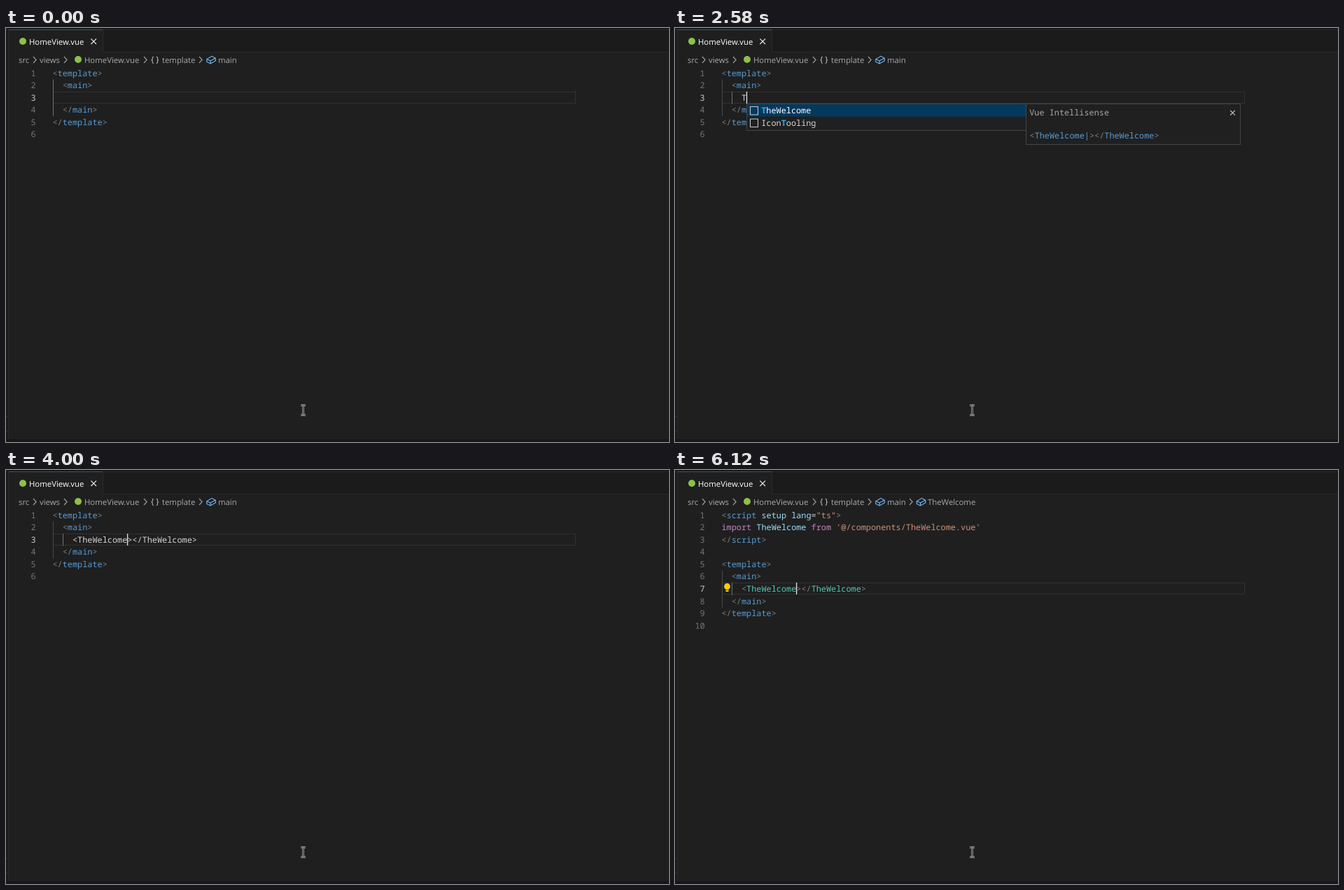
Recreate the animation shown at these times as an HTML page. Size 947 by 592 pixels, loop 6.18 s.

```html
<!DOCTYPE html>
<html lang="en">
<head>
<meta charset="utf-8">
<title>Component auto import</title>
<style>
  html, body { margin: 0; width: 100%; height: 100%; overflow: hidden; background: #1f1f1f; }
  svg { display: block; width: 947px; height: 592px; }
  text { white-space: pre; text-rendering: geometricPrecision; fill: #ccc; }
  .mono { font: 11.87px "Noto Sans Mono", monospace; }
  .ui { font: 11.35px "Open Sans", sans-serif; fill: #a9a9a9; }
  .line { fill: none; stroke-width: 1; }
  .dim { fill: #808080; }
  .tag { fill: #569cd6; }
  .comp { fill: #4ec9b0; }
  .attr { fill: #9cdcfe; }
  .str { fill: #ce9178; }
  .key { fill: #c586c0; }
  .plain { fill: #d4d4d4; }
  .match { fill: #2aaaff; font-weight: 600; }
  .white { fill: #fff; }
  .title { fill: #a6a6a6; }
</style>
</head>
<body>
<svg id="stage" viewBox="0 0 947 592"></svg>
<script>
const LOOP = 6180, LEFT = 66.5, PITCH = 7.12, ROW = 17.59;
const BLINKS = [290, 800, 1250, 1780, 2250, 3310, 3780, 4610, 5120, 5630, 6120];
const COMPONENTS = ['AboutView', 'HelloWorld', 'HomeView', 'IconCommunity', 'IconDocumentation',
  'IconEcosystem', 'IconSupport', 'IconTooling', 'TheWelcome', 'WelcomeItem'];
const stage = document.getElementById('stage');

const esc = s => s.replace(/&/g, '&amp;').replace(/</g, '&lt;');
const span = (cls, s) => `<tspan class="${cls}">${esc(s)}</tspan>`;
const text = (x, y, content, cls = 'mono', extra = '') =>
  `<text x="${x}" y="${y}" class="${cls}" ${extra}>${content}</text>`;
const rect = (x, y, w, h, fill) => `<rect x="${x}" y="${y}" width="${w}" height="${h}" fill="${fill}"/>`;
const frame = (x, y, w, h, stroke, fill = 'none') =>
  `<rect x="${x}" y="${y}" width="${w}" height="${h}" fill="${fill}" stroke="${stroke}"/>`;
const path = (d, stroke, width = 1) =>
  `<path d="${d}" class="line" stroke="${stroke}" style="stroke-width:${width}"/>`;
const cross = (x, y, r, stroke) => path(`M${x - r} ${y - r}l${2 * r} ${2 * r}m0 ${-2 * r}l${-2 * r} ${2 * r}`, stroke, 1.2);
const chevron = x => path(`M${x - 2} 41l4.2 4.5l-4.2 4.5`, '#a0a0a0', 1.1);
const cube = x => path(`M${x - 6.2} 44.6L${x + 1} 40.3L${x + 6.2} 43V47L${x - 1} 51L${x - 6.2} 48.4Z` +
  `M${x - 6.2} 44.6L${x - 1} 47L${x + 6.2} 43M${x - 1} 47V51`, '#75beff', 1.1);
const dot = (x, y) => `<circle cx="${x}" cy="${y}" r="5" fill="#8dc149"/>`;

const open = (name, cls = 'tag') => span('dim', '<') + span(cls, name) + span('dim', '>');
const close = (name, cls = 'tag') => span('dim', '</') + span(cls, name) + span('dim', '>');
const rowTop = n => 55.8 + ROW * (n - 1);

function chrome(crumbTail) {
  return rect(0, 0, 947, 592, '#1f1f1f') + rect(0, 0, 947, 2, '#181818') +
    rect(0, 0, 3, 592, '#1a1a1a') + rect(138, 2, 809, 33, '#1b1b1b') +
    rect(0, 2, 947, 1, '#2a2a2a') + rect(3, 2, 1, 586, '#2b2b2b') +
    rect(138, 3, 1, 32, '#2b2b2b') + rect(138, 34, 809, 1, '#2a2a2a') +
    rect(4, 2, 134, 1, '#1f5f8b') + rect(0, 555, 3, 1, '#2b2b2b') + rect(0, 576, 3, 1, '#2b2b2b') +
    rect(0, 588, 947, 4, '#1a1518') +
    dot(24, 19) + text(33, 23.5, 'HomeView.vue', 'ui white') + cross(125.2, 19.2, 3.8, '#e8e8e8') +
    text(18, 49.6, 'src', 'ui') + chevron(41) + text(48, 49.6, 'views', 'ui') + chevron(85) +
    dot(103, 45) + text(112, 49.6, 'HomeView.vue', 'ui') + chevron(199) +
    text(207, 49.2, '{ }', 'ui plain') + text(223, 49.6, 'template', 'ui') + chevron(278) +
    cube(293) + text(303, 49.6, 'main', 'ui') +
    (crumbTail ? chevron(337) + cube(351.5) + text(361, 49.6, 'TheWelcome', 'ui') : '');
}

function editor(lines, active, typing) {
  const guideTop = rowTop(active - 1), activeTop = rowTop(active);
  const guide = (x, y, h, lit) => rect(x, y, 1, h, lit ? '#707070' : '#484848');
  return frame(67.5, Math.round(activeTop) + .5, 746, 16, '#313131') +
    guide(67, guideTop, ROW * 3, !typing) +
    (typing ? guide(81, activeTop, ROW, true) : '') +
    lines.map((line, i) => {
      const y = 68.5 + ROW * i;
      return text(42.7, y, i + 1, 'mono', `text-anchor="end" style="fill:${i + 1 === active ? '#ccc' : '#6e7681'}"`) +
        text(LEFT, y, line);
    }).join('');
}

function popup(typed) {
  const x = Math.round(LEFT + PITCH * (4 + typed.length)) + .5;
  const items = typed === '' ? COMPONENTS : typed === 'T' ? ['TheWelcome', 'IconTooling'] : ['TheWelcome'];
  const height = items.length * ROW + 2.8;
  const rows = items.map((name, i) => {
    const y = 109 + ROW * i, at = name.indexOf(typed), cls = i ? 'plain' : 'white';
    const label = span(cls, name.slice(0, at)) + span('match', typed) + span(cls, name.slice(at + typed.length));
    return (i ? '' : rect(x + .5, y, 398, ROW, '#04395e')) +
      path(`M${x + 5} ${y + 3.5}v11.5m11 0v-11.5`, '#ccc') +
      path(`M${x + 4.5} ${y + 3.5}h12m-12 11.5h12`, '#ccc') +
      text(x + 20.7, y + 13.1, label);
  }).join('');
  const doc = x + 399;
  return frame(x, 108.5, 399, height, '#454545', '#202020') + rows +
    frame(doc, 108.5, 306, 58, '#454545', '#202020') +
    text(doc + 4.7, 125, 'Vue Intellisense', 'mono title') + cross(doc + 295, 121.2, 3.4, '#c5c5c5') +
    text(doc + 5, 158.2, span('dim', '<') + span('tag', items[0] + '|') + span('dim', '>') + close(items[0]));
}

const bulb = '<path d="M74.5 162a4.5 4.5 0 0 0-3 7.8l1 1.2h4l1-1.2a4.5 4.5 0 0 0-3-7.8z" fill="#fc0"/>' +
  rect(72.5, 171.7, 4, 2.3, '#fc0');

const pointer = 'M421 539.5h2.5l1 1l1-1h2.5m-3.5 1v12m-3.5 1h2.5l1-1l1 1h2.5';

function draw(t) {
  const imported = t >= 4230, inserted = t >= 4000;
  const typed = t < 2580 ? '' : t < 2800 ? 'T' : t < 2910 ? 'Th' : 'The';
  const active = imported ? 7 : 3;
  const name = t >= 5170 ? 'comp' : 'tag';
  const content = imported ? open('TheWelcome', name) + close('TheWelcome', name)
    : span('plain', inserted ? '<TheWelcome></TheWelcome>' : typed);
  const script = [
    span('dim', '<') + span('tag', 'script') + span('attr', ' setup lang') + span('plain', '=') +
      span('str', '"ts"') + span('dim', '>'),
    span('key', 'import') + span('attr', ' TheWelcome ') + span('key', 'from') +
      span('str', " '@/components/TheWelcome.vue'"),
    close('script'), ''];
  const template = [open('template'), '  ' + open('main'), '    ' + content,
    '  ' + close('main'), close('template'), ''];
  const column = inserted ? 15 : 4 + typed.length;
  const cursorOn = BLINKS.filter(b => b <= t).length % 2 === 1;

  stage.innerHTML = chrome(t >= 4510) +
    editor(imported ? [...script, ...template] : template, active, t >= 2580) +
    (t >= 4890 ? bulb : '') +
    (t >= 1630 && !inserted ? popup(typed) : '') +
    (cursorOn ? rect(66.3 + 7.11 * column, Math.round(rowTop(active)), 1.3, 17, '#e4e4e4') : '') +
    path(pointer, '#b4b4b4', 2.4) + path(pointer, '#1f1f1f', .8);
}

const CHANGES = [...BLINKS, 1630, 2580, 2800, 2910, 4000, 4230, 4510, 4890, 5170];
let shown = -1;
function tick() {
  const t = performance.now() % LOOP;
  const step = CHANGES.filter(c => c <= t).length;
  if (step !== shown) draw(t);
  shown = step;
  requestAnimationFrame(tick);
}
tick();
</script>
</body>
</html>
```
